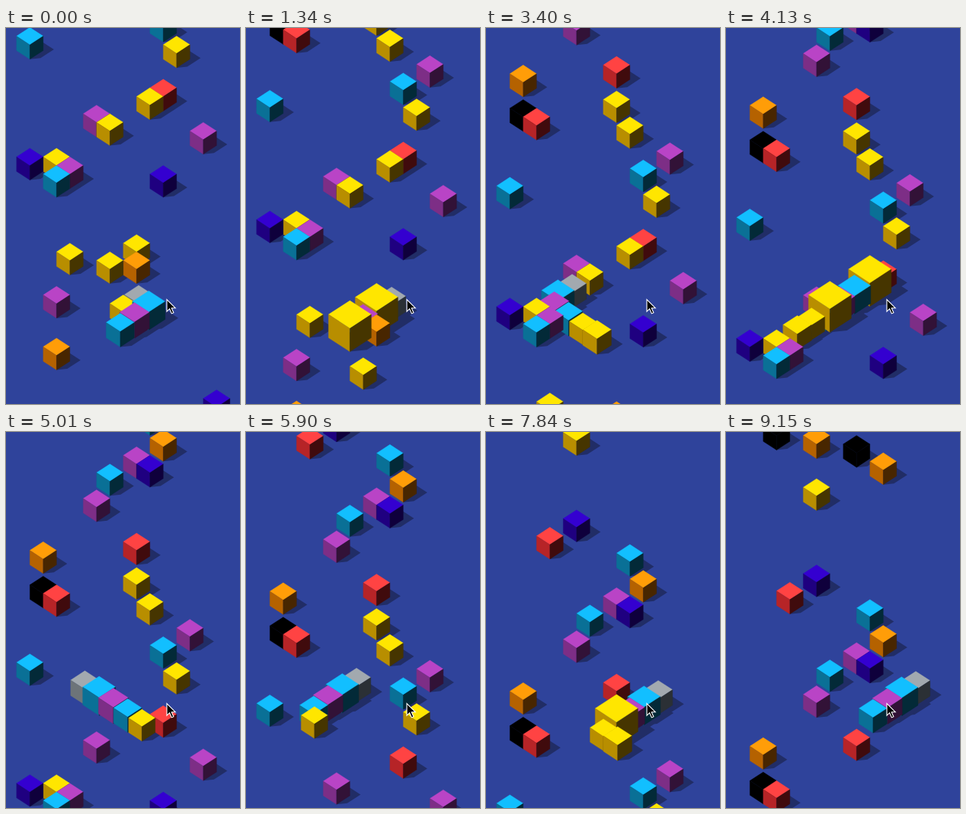
An HTML page that plays this animation: 307 by 491 pixels, repeating every 9.3 s.

```html
<!DOCTYPE html>
<html lang="en">
<head>
<meta charset="utf-8">
<title>Cube snake</title>
<style>
  html, body { margin: 0; width: 100%; height: 100%; overflow: hidden; background: #2f439b; }
  svg { display: block; width: 100vw; height: 100vh; }
</style>
</head>
<body>
<svg viewBox="0 0 307 491" preserveAspectRatio="none">
  <defs id="defs"></defs>
  <rect width="307" height="491" fill="#2f439b"/>
  <g id="shadows"></g>
  <g id="cubes"></g>
  <path d="M211 354.5v15.6l3.6-3.4 2.7 6.2 2.6-1.1-2.7-6.1h5z" fill="#000" stroke="#fff" stroke-width="1.1"/>
</svg>
<script>
const byId = id => document.getElementById(id);
const LOOP = 9300, LAST = 62;
const COL = 17.5, ROW = 11.27, SLOPE = ROW / COL;
const BASE = 9.5;            // ground centre below the cube centre
const GAP = 18.7, BIG = 1.6;

// top, left and right face
const PAINT = {
  yellow: ['#ffe600', '#b88e00', '#463500'],
  cyan:   ['#12bfff', '#0a7096', '#032a38'],
  red:    ['#ff4343', '#b62427', '#400b0d'],
  purple: ['#b944c6', '#7d2e86', '#321237'],
  blue:   ['#3400d0', '#1f0080', '#0f003c'],
  orange: ['#ff9d08', '#b56200', '#482600'],
  black:  ['#000', '#000', '#000'],
  grey:   ['#a2a9af', '#6d7479', '#2b3035']
};

// column:row on the diagonal lattice
const FIELD = {
  cyan: '0:0 10:-2 2:16 6:-22 9:-29',
  yellow: '11:1 2:14 3:25 7:31 5:-43',
  red: '10:6 2:-8 8:-14 3:-31',
  purple: '5:9 13:11 3:15 2:30 12:-4 5:-19 8:-24',
  blue: '0:14 10:16 14:42 9:-23 5:-33',
  orange: '8:26 2:36 1:-13 10:-26 5:-49 10:-46',
  black: '1:-9 2:-50 8:-48'
};

// cubes the snake eats: column, row, distance along its path
const FOOD = [
  [6, 26, 145.5], [8, 24, 180.5], [6, 10, 425.7],
  [9, 7, 478.7], [9, -7, 721], [8, -10, 776.3]
];
const BODY = ['grey', 'cyan', 'purple', 'cyan', 'yellow', 'yellow'];
const SIZE = [1.07, 1.23, 1.12, 1.06, 1, 1.07];

// x of each turn of the zigzag path
const TURNS = [130, 190, 120.5, 222.7, 82.6, 189.5, 80, 200.9, 152.6, 242, 188.5, 300];
const PATH_Y = 407.9;

const CLOCK = [[0, 0], [1200, 8], [2380, 16], [3550, 24], [4720, 32], [5900, 40], [6950, 47], [8130, 55], [9300, 63]];
const SCROLL = [[0, 0], [9, 82], [17, 146], [28, 237], [40, 344], [53, 474.5], [62, 546.3]];
const TRAVEL = [[0, 76], [9, 200], [17, 313.4], [28, 476.2], [40, 653.2], [53, 830.8], [62, 960.8]];

function lerpKeys(keys, t) {
  let i = 1;
  while (i < keys.length - 1 && t > keys[i][0]) i++;
  const [a, va] = keys[i - 1], [b, vb] = keys[i];
  return va + (vb - va) * (t - a) / (b - a);
}

function pathPoint(dist) {
  let left = dist, i = 0;
  while (i < TURNS.length - 2 && left > Math.abs(TURNS[i + 1] - TURNS[i])) {
    left -= Math.abs(TURNS[i + 1] - TURNS[i]);
    i++;
  }
  return [TURNS[i] + Math.sign(TURNS[i + 1] - TURNS[i]) * left, PATH_Y - SLOPE * dist];
}

const place = (col, row) => [31.3 + COL * col, 20 + ROW * row];

const scenery = Object.entries(FIELD).flatMap(([color, list]) =>
  list.split(' ').map(cell => {
    const [x, y] = place(...cell.split(':').map(Number));
    return { color, x, y, size: 1, depth: y };
  }));

// shapes are drawn with the ground centre at 0,0
byId('defs').innerHTML = Object.entries(PAINT).map(([name, [top, left, right]]) =>
  `<g id="${name}" stroke-width=".3" stroke-linejoin="round">
    <path d="M0-30.3L17.5-19 0-7.6-17.5-19z" fill="${top}" stroke="${top}"/>
    <path d="M-17.5-19L0-7.6V11.3L-17.5 0z" fill="${left}" stroke="${left}"/>
    <path d="M17.5-19L0-7.6V11.3L17.5 0z" fill="${right}" stroke="${right}"/>
  </g>`).join('') +
  '<path id="shade" d="M0 11.3L14 9.8 31.5-1.5 14-12.8 0-11.3z" fill="#212d66"/>';

function scene(frame) {
  const head = lerpKeys(TRAVEL, frame);
  const list = scenery.slice();
  let tail = 0;
  for (const [col, row, at] of FOOD) {
    const [x, y] = place(col, row);
    if (head >= at + (4 + tail) * GAP) {
      tail = (tail + 1) % 3;          // three alike vanish
      continue;
    }
    const eaten = head >= at - 8;
    list.push({ color: 'yellow', x, y, size: eaten ? BIG : 1, depth: eaten ? y + 10 : y });
  }
  for (let i = 0; i < 4 + tail; i++) {
    const [x, y] = pathPoint(head - i * GAP);
    list.push({ color: BODY[i], x, y, size: SIZE[i], depth: y });
  }
  return list.sort((a, b) => a.depth - b.depth);
}

function draw(frame) {
  const shift = lerpKeys(SCROLL, frame) + BASE;
  const list = scene(frame).filter(c => c.y + shift > -40 && c.y + shift < 550);
  const use = (id, c) =>
    `<use href="#${id}" transform="translate(${c.x.toFixed(2)} ${(c.y + shift).toFixed(2)}) scale(${c.size})"/>`;
  byId('shadows').innerHTML = list.map(c => use('shade', c)).join('');
  byId('cubes').innerHTML = list.map(c => use(c.color, c)).join('');
}

let shown = -1;
const start = performance.now();
function tick() {
  const t = (performance.now() - start) % LOOP;
  const frame = Math.min(LAST, Math.floor(lerpKeys(CLOCK, t + 8)));
  if (frame !== shown) draw(shown = frame);
  requestAnimationFrame(tick);
}
tick();
</script>
</body>
</html>
```
